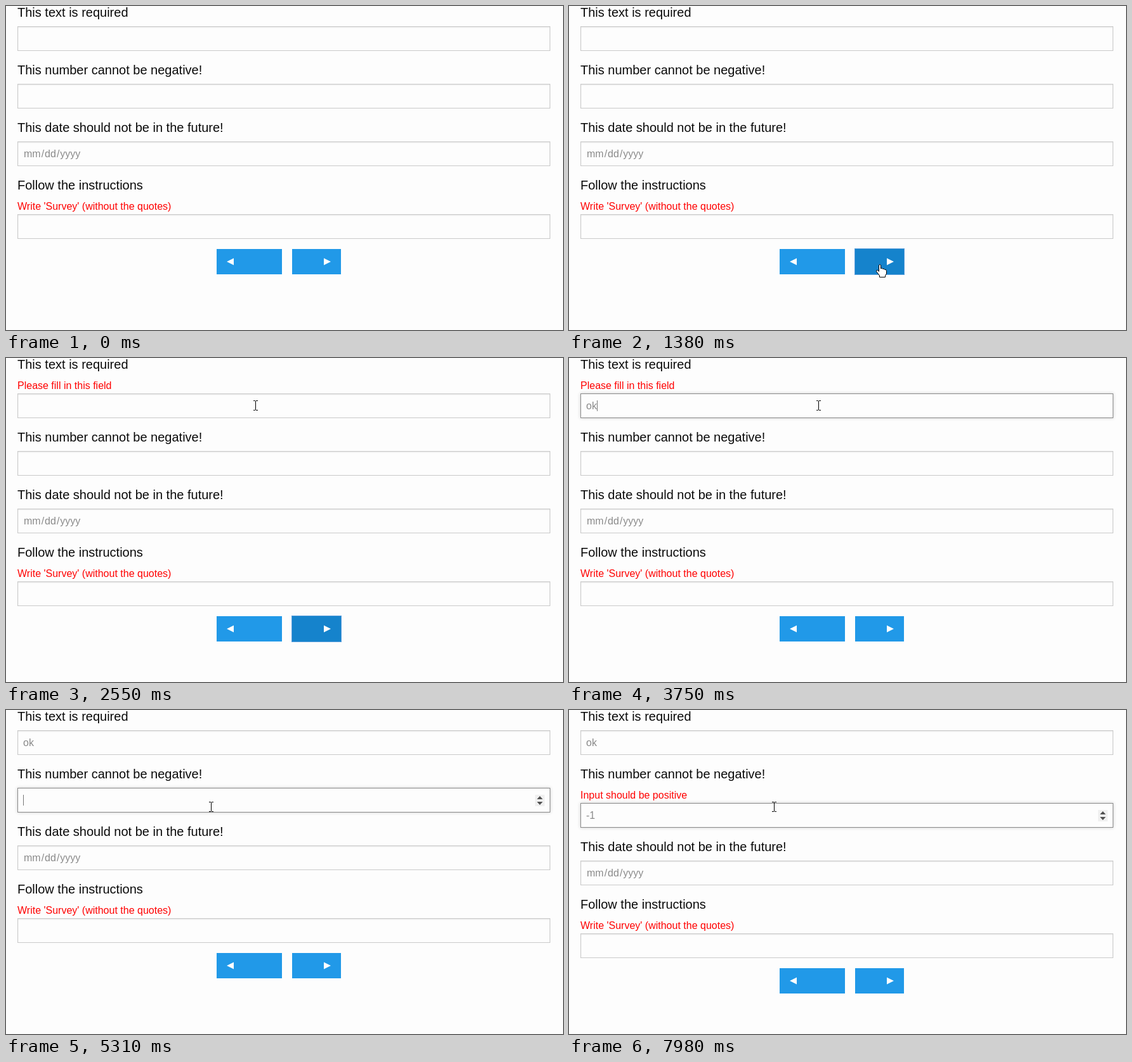
Write an HTML page that moves like this. It is 878 px wide and 512 px high and loops after 8000 ms.

```html
<!DOCTYPE html>
<html lang="en">
<head>
<meta charset="utf-8">
<title>Survey validation</title>
<style>
  html, body { margin: 0; width: 100%; height: 100%; overflow: hidden; background: #fdfdfd; }
  body { position: relative; font: 16px/17px "Liberation Sans", Arial, sans-serif; color: #0a0a0a; }
  body * { position: absolute; box-sizing: border-box; white-space: pre; }
  span, svg * { position: static; }
  .block { left: 0; top: 0; width: 878px; height: 512px; }
  .label { left: 18px; font-size: 20px; line-height: 22px; }
  .error { left: 18px; color: #f00; }
  .field {
    left: 18px; width: 840px; height: 39px; border: 1px solid #cacaca; color: #8a8a8a;
    box-shadow: inset 0 1px 2px rgba(10, 10, 10, .1), 0 0 5px rgba(202, 202, 202, 0);
  }
  .value { left: 8px; top: 10px; }
  .date span { padding: 0 1px; }
  .caret { left: 8px; top: 10px; width: 1px; height: 17px; background: #777; }
  .button {
    top: 384px; height: 40px; background: #2199e8; color: #fefefe;
    font-size: 14.4px; line-height: 40px;
  }
  .button svg { top: 14px; fill: #fefefe; }
  svg { left: 0; top: 0; overflow: visible; }

  /* 1% of the loop is 80 ms */
  .step { animation: 8s step-end -10ms infinite; }
  .ease { animation: 8s ease-in-out -10ms infinite; }
  #rest1 { animation-name: shift1; }
  #rest2 { animation-name: shift2; }
  #error1 { animation-name: error1; }
  #error2 { animation-name: error2; }
  #field1 { animation-name: focus1; }
  #field2 { animation-name: focus2; }
  #o { animation-name: typeO; }
  #k { animation-name: typeK; }
  #minus { animation-name: typeMinus; }
  #one { animation-name: typeOne; }
  #caret1 { animation-name: caret1; }
  #caret2 { animation-name: caret2; }
  #spinner { animation-name: spinner; }
  #picker { animation-name: picker; }
  #next { left: 451px; width: 77px; animation-name: press; }
  #ring { inset: -1px; border: 1px solid #5c9fdc; animation-name: ring; }
  #pointer { animation: move 8s linear -10ms infinite; }
  #arrow { animation-name: arrow; }
  #beam { animation-name: beam; }
  #hand { animation-name: hand; }

  @keyframes shift1 { 0%, 48.375% { top: 0 } 18.375% { top: 24px } }
  @keyframes shift2 { 0% { top: 0 } 81%, 100% { top: 24px } }
  @keyframes error1 { 0%, 48.375%, 100% { visibility: hidden } 18.375% { visibility: visible } }
  @keyframes error2 { 0% { visibility: hidden } 81%, 100% { visibility: visible } }
  @keyframes typeO { 0% { visibility: hidden } 45.375%, 100% { visibility: visible } }
  @keyframes typeK { 0% { visibility: hidden } 46.875%, 100% { visibility: visible } }
  @keyframes typeMinus { 0% { visibility: hidden } 77.625%, 100% { visibility: visible } }
  @keyframes typeOne { 0% { visibility: hidden } 80.625%, 100% { visibility: visible } }
  @keyframes focus1 {
    36%, 63.75% {
      border-color: #8a8a8a;
      box-shadow: inset 0 1px 2px rgba(10, 10, 10, 0), 0 0 5px rgba(202, 202, 202, 1);
    }
    0%, 33%, 66.375%, 100% {
      border-color: #cacaca;
      box-shadow: inset 0 1px 2px rgba(10, 10, 10, .1), 0 0 5px rgba(202, 202, 202, 0);
    }
  }
  @keyframes focus2 {
    0%, 63.75% {
      border-color: #cacaca;
      box-shadow: inset 0 1px 2px rgba(10, 10, 10, .1), 0 0 5px rgba(202, 202, 202, 0);
    }
    66.375%, 100% {
      border-color: #8a8a8a;
      box-shadow: inset 0 1px 2px rgba(10, 10, 10, 0), 0 0 5px rgba(202, 202, 202, 1);
    }
  }
  @keyframes caret1 {
    0%, 39.75%, 53.25%, 63.75%, 100% { visibility: hidden; left: 8px }
    33% { visibility: visible; left: 8px }
    45.375% { visibility: visible; left: 17px }
    46.875%, 59.625% { visibility: visible; left: 25px }
  }
  @keyframes caret2 {
    0%, 70.125%, 86.625%, 99.75%, 100% { visibility: hidden; left: 8px }
    63.75%, 76.5% { visibility: visible; left: 8px }
    77.625% { visibility: visible; left: 13px }
    80.625%, 93.375% { visibility: visible; left: 22px }
  }
  @keyframes spinner {
    0%, 5.7%, 28.5% { visibility: hidden }
    4.95%, 27%, 61.5%, 100% { visibility: visible }
  }
  @keyframes picker {
    0%, 8.4%, 25.25%, 100% { visibility: hidden }
    6.9%, 24.375% { visibility: visible }
  }
  @keyframes press {
    0%, 13.875%, 36%, 100% { background: #2199e8 }
    17%, 33% { background: #1583cc }
  }
  @keyframes ring { 0%, 33%, 100% { visibility: hidden } 16.875% { visibility: visible } }
  @keyframes arrow {
    0%, 4.95%, 12%, 13.875%, 27%, 31.125%, 61.5%, 100% { visibility: hidden }
    3.75%, 5.7%, 13.5%, 22.25%, 28.5%, 60.375% { visibility: visible }
  }
  @keyframes beam {
    0%, 5.7%, 13.5%, 22.25%, 28.5%, 60.375% { visibility: hidden }
    4.95%, 12%, 21.375%, 27%, 31.125%, 61.5%, 100% { visibility: visible }
  }
  @keyframes hand { 0%, 21.375%, 100% { visibility: hidden } 13.875% { visibility: visible } }
  @keyframes move {
    0%, 3.75% { transform: translate(870px, 46px) }
    4.125% { transform: translate(841px, 78px) }
    4.5% { transform: translate(829px, 93px) }
    5.25% { transform: translate(790px, 142px) }
    6% { transform: translate(752px, 184px) }
    6.75% { transform: translate(727px, 210px) }
    7.5% { transform: translate(698px, 232px) }
    8.25% { transform: translate(678px, 250px) }
    9% { transform: translate(650px, 274px) }
    9.75% { transform: translate(640px, 284px) }
    11.625% { transform: translate(594px, 318px) }
    12.375% { transform: translate(575px, 338px) }
    13.125% { transform: translate(520px, 369px) }
    13.5% { transform: translate(506px, 380px) }
    13.875% { transform: translate(499px, 392px) }
    14.625%, 21% { transform: translate(490px, 408px) }
    21.75% { transform: translate(466px, 375px) }
    22.5% { transform: translate(444px, 340px) }
    23.25% { transform: translate(432px, 307px) }
    24% { transform: translate(422px, 275px) }
    25.125% { transform: translate(412px, 243px) }
    26.25% { transform: translate(408px, 205px) }
    27.75% { transform: translate(400px, 165px) }
    29.25% { transform: translate(391px, 120px) }
    30.75% { transform: translate(391px, 94px) }
    31.5%, 60% { transform: translate(393px, 75px) }
    60.375% { transform: translate(388px, 78px) }
    60.75% { transform: translate(376px, 80px) }
    61.125% { transform: translate(351px, 106px) }
    61.5% { transform: translate(330px, 140px) }
    61.875%, 100% { transform: translate(323px, 153px) }
  }
</style>
</head>
<body>
  <div class="label" style="top:-1px">This text is required</div>
  <div class="error step" id="error1" style="top:35px">Please fill in this field</div>

  <div class="block step" id="rest1">
    <div class="field ease" id="field1" style="top:32px">
      <div class="value"><span class="step" id="o">o</span><span class="step" id="k">k</span></div>
      <div class="caret step" id="caret1"></div>
    </div>
    <div class="label" style="top:90px">This number cannot be negative!</div>
    <div class="error step" id="error2" style="top:126px">Input should be positive</div>

    <div class="block step" id="rest2">
      <div class="field ease" id="field2" style="top:123px">
        <div class="value"><span class="step" id="minus">-</span><span class="step" id="one">1</span></div>
        <div class="caret step" id="caret2"></div>
        <svg class="step" id="spinner" width="838" height="37">
          <path fill="#f0f0f0" d="M815 10h15v18h-15z"/>
          <path fill="#505050" d="M818 17l4.5-5 4.5 5zM818 21h9l-4.5 5z"/>
        </svg>
      </div>

      <div class="label" style="top:181px">This date should not be in the future!</div>
      <div class="field" style="top:214px">
        <div class="value date"><span>mm</span>/<span>dd</span>/<span>yyyy</span></div>
        <svg class="step" id="picker" width="838" height="37">
          <path fill="#f0f0f0" d="M794 8h15v25h-15z"/>
          <path fill="#505050" d="M797 18l4.5-5 4.5 5zM797 23h9l-4.5 5zM814 15h11l-5.5 7z"/>
        </svg>
      </div>

      <div class="label" style="top:272px">Follow the instructions</div>
      <div class="error" style="top:308px">Write 'Survey' (without the quotes)</div>
      <div class="field" style="top:329px"></div>

      <div class="button" style="left:332px;width:103px">
        <svg style="left:16px" width="11" height="12"><path d="M11 .5v11L0 6z"/></svg>
        <div style="left:32px">Previous</div>
      </div>
      <div class="button ease" id="next">
        <div id="ring" class="step"></div>
        <div style="left:15.5px">Next</div>
        <svg style="left:50px" width="11" height="12"><path d="M0 .5v11L11 6z"/></svg>
      </div>
    </div>
  </div>

  <svg id="pointer" width="24" height="24">
    <path id="arrow" class="step" fill="#fff" stroke="#101020" d="M.5 .5V16.5L4.3 13L6.8 18.5L9.3 17.4L6.9 12H12z"/>
    <path id="beam" class="step" fill="none" stroke="#000" d="M-3 -7.5H0M1 -7.5H4M-3 7.5H0M1 7.5H4M.5 -7V7"/>
    <path id="hand" class="step" fill="#fff" stroke="#000" d="M-1.5 10V1.5Q0 -.5 1.5 1.5V7Q3.5 5.5 4.5 7.5Q6.5 6.500 7.500 8.500Q10.500 8 10.500 10.500V15L8.500 18V20.500H-.5V18L-5.500 11.500Q-5.500 9 -3.500 9.500L-1.500 11.500z"/>
  </svg>
</body>
</html>
```
